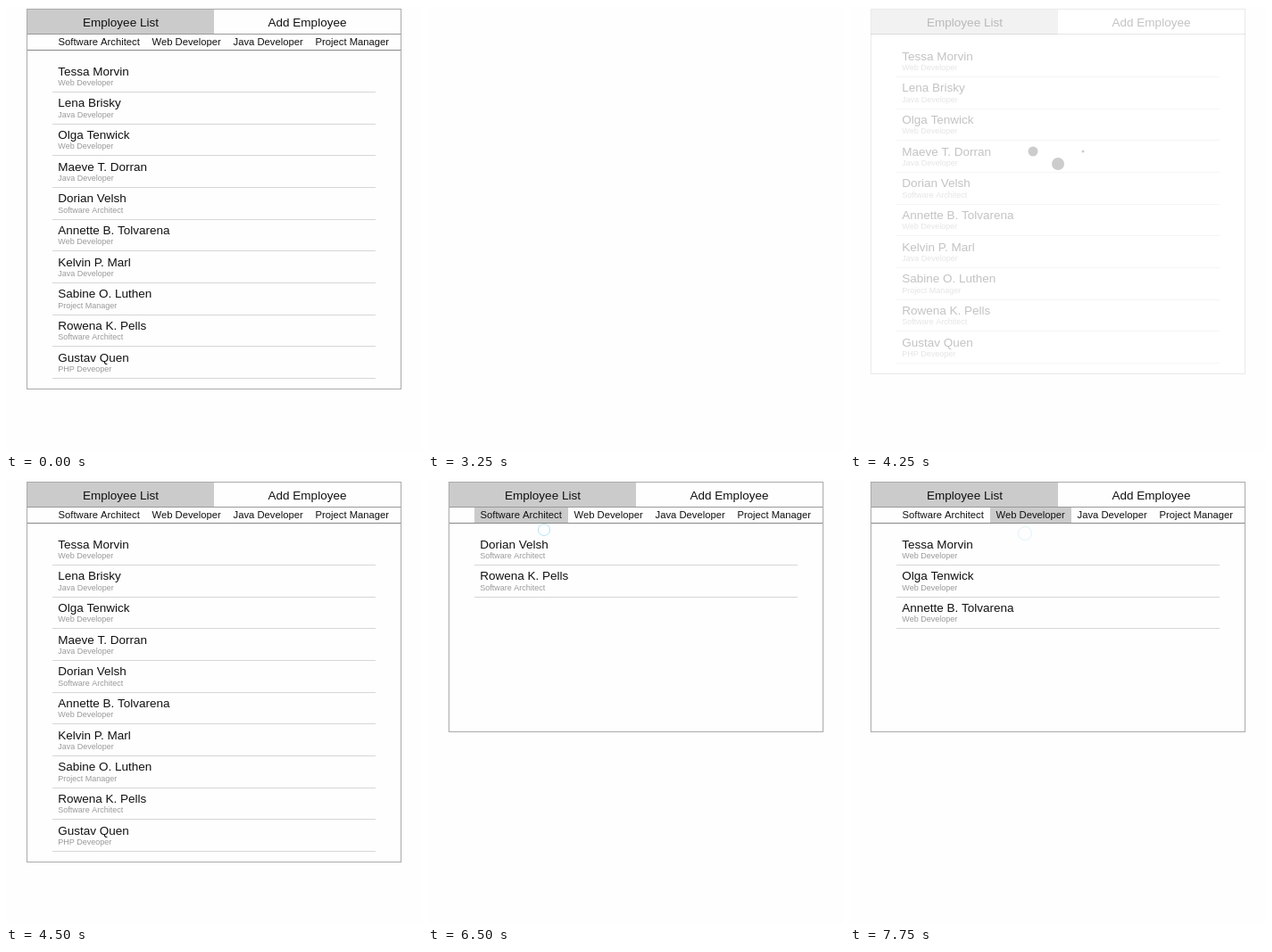
Write an HTML page with a canvas that moves like this. It is 466 px wide and 499 px high and loops after 8 s.

```html
<!DOCTYPE html>
<html lang="en">
<head>
<meta charset="utf-8">
<title>Employee list</title>
<style>
html, body { margin: 0; width: 100%; height: 100%; overflow: hidden; background: #fefefe; }
canvas { display: block; }
</style>
</head>
<body>
<canvas id="stage" width="466" height="499"></canvas>
<script>
const ctx = document.getElementById('stage').getContext('2d');
const LOOP = 8000, TICK = 250;
const PAPER = '#fefefe', SHADE = '#cbcbcb', INK = '#111', EDGE = '#aaa', RULE = '#d6d6d6';
const LEFT = 23, RIGHT = 443, TOP = 3;

const [SA, WD, JD, PM, PHP] =
  ['Software Architect', 'Web Developer', 'Java Developer', 'Project Manager', 'PHP Deveoper'];

const staff = [
  ['Tessa Morvin', WD], ['Lena Brisky', JD], ['Olga Tenwick', WD],
  ['Maeve T. Dorran', JD], ['Dorian Velsh', SA], ['Annette B. Tolvarena', WD],
  ['Kelvin P. Marl', JD], ['Sabine O. Luthen', PM], ['Rowena K. Pells', SA],
  ['Gustav Quen', PHP]
];

const filters = [
  { job: SA, x: 52, w: 105 }, { job: WD, x: 157, w: 91 },
  { job: JD, x: 248, w: 92 }, { job: PM, x: 340, w: 96 }
];

// Pointer keys: time, x, y, radius, opacity
const pointer = [
  [0], [250, 294, 126, 5.5, 1], [750, 199, 62, 5.5, 1], [1000, 188, 53, 5.5, 1], [1750],
  [5750, 179, 63, 5.5, 1], [6000, 161, 55, 5.5, 1], [6250, 134, 43, 5.5, 1],
  [6500, 130, 57, 6.5, 1], [6750, 130, 57, 7.5, 0.35], [7000, 198, 49, 6, 0.4],
  [7250, 198, 49, 6, 1], [7500, 196, 61, 6.5, 1], [7750, 196, 61, 7.5, 0.4]
];

function text(str, x, y, size, color = INK, align = 'left') {
  ctx.font = `${size}px "Liberation Sans", Arial, sans-serif`;
  ctx.textAlign = align;
  ctx.fillStyle = color;
  ctx.fillText(str, x, y);
}

function box(x, y, w, h, color) {
  ctx.fillStyle = color;
  ctx.fillRect(x, y, w, h);
}

function dot(x, y, r) {
  ctx.beginPath();
  ctx.arc(x, y, r, 0, Math.PI * 2);
}

function header() {
  box(LEFT + 1, TOP + 1, 209, 28, SHADE);
  text('Employee List', 128.5, 23, 13.5, INK, 'center');
  text('Add Employee', 337.5, 23, 13.5, INK, 'center');
  box(LEFT, 31, RIGHT - LEFT, 1, '#999');
}

function filterBar(active) {
  for (const { job, x, w } of filters) {
    if (job === active) box(x, 32, w, 17, SHADE);
    text(job, x + 6.5, 44, 11.25);
  }
  box(LEFT, 49, RIGHT - LEFT, 1, '#888');
}

function list(people, shift) {
  people.forEach(([name, job], i) => {
    const y = 77.5 + i * 35.68 - shift;
    text(name, 58.3, y, 13.5);
    text(job, 58.3, y + 11.5, 9, '#999');
    box(52, Math.round(y + 18.5), 362, 1, RULE);
  });
}

function panel({ people = staff, bar = true, active = null, alpha = 1 }) {
  const shift = bar ? 0 : 17;
  const bottom = people.length > 5 ? 430 - shift : 284;
  ctx.save();
  ctx.globalAlpha = alpha;
  box(LEFT, TOP, RIGHT - LEFT, bottom - TOP, PAPER);
  header();
  if (bar) filterBar(active);
  list(people, shift);
  ctx.strokeStyle = EDGE;
  ctx.lineWidth = 1;
  ctx.strokeRect(LEFT + 0.5, TOP + 0.5, RIGHT - LEFT - 1, bottom - TOP - 1);
  ctx.restore();
}

const filtered = job => ({ people: staff.filter(p => p[1] === job), active: job });

// Six dots in a ring; the pulse moves one place clockwise every tick
function spinner(t) {
  const sizes = [5.5, 7, 1.5];
  const lead = (t - 4250) / TICK;
  ctx.fillStyle = '#ccc';
  sizes.forEach((r, i) => {
    const a = Math.PI * (5 / 6 + (lead - i) / 3);
    dot(233 + 32.3 * Math.cos(a), 149 + 28 * Math.sin(a), r);
    ctx.fill();
  });
}

function drawPointer(t) {
  const [, x, y, r, alpha] = pointer.filter(k => k[0] <= t).pop();
  if (!r) return;
  ctx.save();
  ctx.globalAlpha = alpha;
  ctx.strokeStyle = '#b3e2f2';
  ctx.lineWidth = 1;
  dot(x, y, r);
  ctx.stroke();
  ctx.restore();
}

function draw(t) {
  box(0, 0, 466, 499, PAPER);
  if (t < 3250) panel({});
  else if (t < 3750) return;
  else if (t < 4500) {
    panel({ people: t < 4000 ? [] : staff, bar: false, alpha: 0.25 });
    spinner(t);
  } else if (t < 6500) panel({});
  else if (t < 7750) {
    panel(filtered(SA));
    if (t >= 7500) panel({ ...filtered(WD), alpha: 0.5 });
  } else panel(filtered(WD));
  drawPointer(t);
}

const start = performance.now();
function frame() {
  const t = (performance.now() - start) % LOOP;
  draw(Math.floor(t / TICK) * TICK);
  requestAnimationFrame(frame);
}
frame();
</script>
</body>
</html>
```
